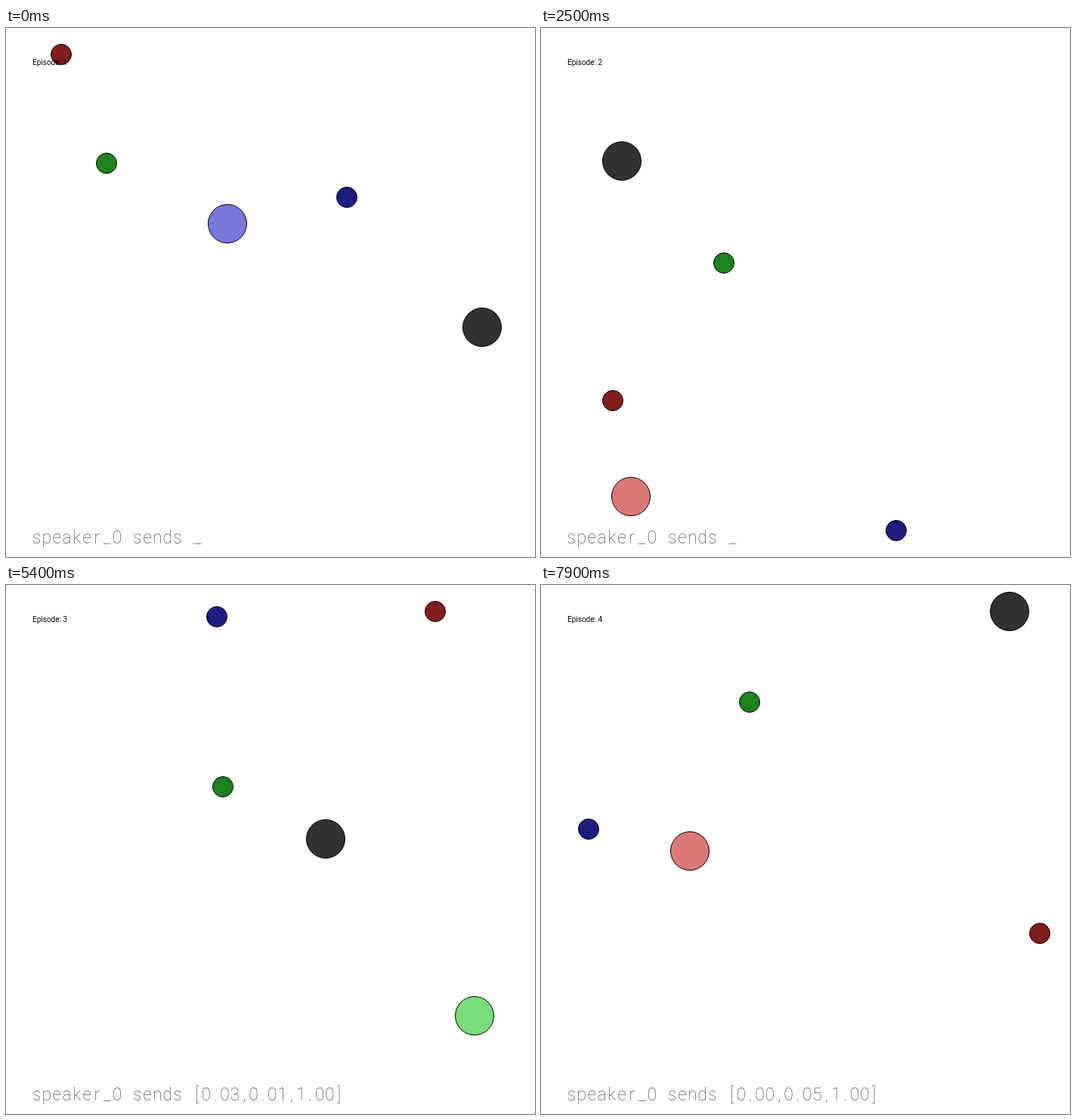
An HTML page that plays this animation: 700x700 px, repeating every 8 s.

```html
<!DOCTYPE html>
<html>
<head>
<meta charset="utf-8">
<style>
  html, body { margin: 0; width: 100%; height: 100%; overflow: hidden; background: #fff; }
  svg { display: block; width: 700px; height: 700px; }
  circle { stroke: #000; stroke-width: 1; }
  #episode { font: 10px Roboto, "Liberation Sans", sans-serif; }
  #message { font: 100 23px Roboto, Lato, sans-serif; fill: #3c3c3c; text-anchor: middle; }
</style>
</head>
<body>
<svg viewBox="0 0 700 700">
  <g id="dots"></g>
  <text id="episode" x="35" y="48.5"></text>
  <text id="message" y="682"></text>
</svg>
<script>
const RED = 'rgb(130,30,30)', GREEN = 'rgb(30,130,30)', BLUE = 'rgb(30,30,130)', DARK = 'rgb(50,50,50)';
const COLORS = [RED, GREEN, BLUE, DARK];
const STEP = 100, EPISODE_STEPS = 25, TOTAL_STEPS = 80, REACH = 315;

// fixed: red, green, blue and speaker positions; path: [step, x, y]; words: [step, a, b, c]
const episodes = [
  { fixed: [[73, 35], [133, 179], [451, 224], [630, 396]], color: 'rgb(120,120,220)',
    path: [[0, 293, 259], [2, 294, 257.5], [5, 297, 253.5], [8, 299, 251.4], [11, 299, 252], [18, 292, 252.5], [24, 288, 253]],
    words: [[11, 0, 0, .86]] },
  { fixed: [[95, 493], [242, 311], [470, 665], [107, 176]], color: 'rgb(220,120,120)',
    path: [[0, 119, 620], [2, 121, 619.6], [5, 129, 618.5], [11, 148, 616], [17, 156, 608], [24, 159, 608]],
    words: [[17, .1, .12, .96]] },
  { fixed: [[568, 35], [287, 267], [279, 42], [423, 336]], color: 'rgb(120,220,120)',
    path: [[0, 572, 571], [2, 587, 570.5], [4, 620, 570], [8, 729, 567], [13, 875, 563], [17, 942, 560], [20, 974, 558], [24, 1000, 556]],
    words: [[4, .03, .01, 1], [17, .02, 0, 1]] },
  { fixed: [[660, 461], [276, 155], [63, 323], [620, 35]], color: 'rgb(220,120,120)',
    path: [[0, 195, 353], [4, 197, 352]],
    words: [[4, 0, .05, 1]] }
];

const $ = id => document.getElementById(id);
const circles = [...COLORS, ''].map((fill, i) => {
  const c = document.createElementNS('http://www.w3.org/2000/svg', 'circle');
  c.setAttribute('r', i < 3 ? 13.5 : 25.5);
  c.setAttribute('fill', fill);
  return $('dots').appendChild(c);
});

function lerpKeys(keys, s) {
  const next = keys.findIndex(k => k[0] >= s);
  if (next === 0) return keys[0].slice(1);
  if (next < 0) return keys.at(-1).slice(1);
  const a = keys[next - 1], b = keys[next], u = (s - a[0]) / (b[0] - a[0]);
  return a.slice(1).map((v, i) => v + (b[i + 1] - v) * u);
}

function messageAt(ep, s) {
  if (!s) return '_';
  const wave = Math.sin((s - ep.words[0][0]) * 6 * Math.PI / 13);
  const noise = [.02, -.03, .04];
  const values = lerpKeys(ep.words, s).map((v, i) =>
    Math.min(1, Math.max(0, v + noise[i] * wave)).toFixed(2));
  return `[${values}]`;
}

function setMessage(str) {
  let x = 34;
  const xs = [...str].map(ch => {
    const advance = '[],.'.includes(ch) ? 11.4 : 13.3;
    x += advance;
    return (x - advance / 2).toFixed(1);
  });
  $('message').setAttribute('x', xs.join(' '));
  $('message').textContent = str;
}

let shown = -1;
function draw(now) {
  requestAnimationFrame(draw);
  const n = Math.floor(now / STEP) % TOTAL_STEPS;
  if (n === shown) return;
  shown = n;
  const index = Math.floor(n / EPISODE_STEPS), s = n % EPISODE_STEPS, ep = episodes[index];
  const points = [...ep.fixed, lerpKeys(ep.path, s)];
  // The view zooms out to keep the farthest dot in reach.
  const far = Math.max(REACH, ...points.flat().map(v => Math.abs(v - 350)));
  const project = v => Math.round(350 + (v - 350) * REACH / far);
  points.forEach(([x, y], i) => {
    circles[i].setAttribute('cx', project(x));
    circles[i].setAttribute('cy', project(y));
  });
  circles[4].setAttribute('fill', ep.color);
  $('episode').textContent = 'Episode: ' + (index + 1);
  setMessage('speaker_0 sends ' + messageAt(ep, s));
}
draw(0);
</script>
</body>
</html>
```
